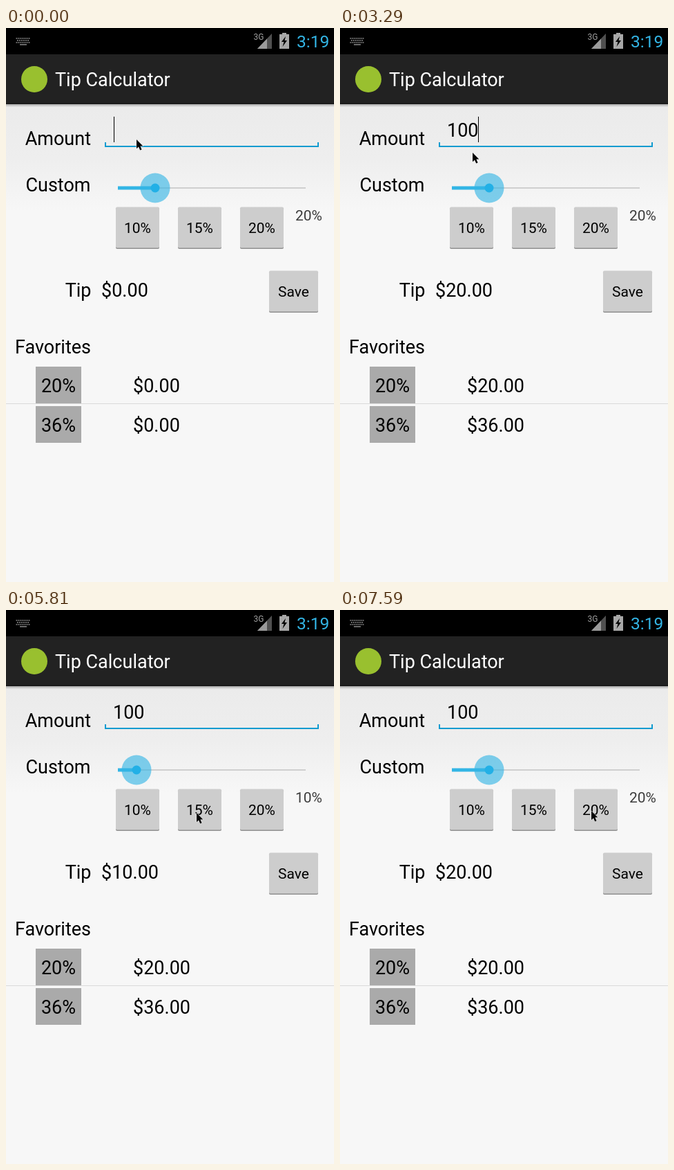
Recreate the animation shown at these times as an HTML page. Size 475 by 800 pixels, loop 8 s.

```html
<!DOCTYPE html>
<html lang="en">
<head>
<meta charset="utf-8">
<title>Tip Calculator</title>
<style>
  html, body { margin: 0; width: 100%; height: 100%; overflow: hidden; background: #f7f7f7; }
  svg { display: block; width: 475px; height: 800px; }
  text { font: 27px Roboto, "Noto Sans", sans-serif; white-space: pre; }
  .small { font-size: 21px; }
  .end { text-anchor: end; }
  .mid { text-anchor: middle; }
</style>
</head>
<body>
<svg id="stage" viewBox="0 0 475 800">
  <defs>
    <linearGradient id="page" gradientUnits="userSpaceOnUse" x1="0" y1="112" x2="0" y2="265">
      <stop offset="0" stop-color="#ebebeb"/>
      <stop offset=".5" stop-color="#eeeeee"/>
      <stop offset="1" stop-color="#f7f7f7"/>
    </linearGradient>
    <linearGradient id="shade" x1="0" y1="0" x2="0" y2="1">
      <stop offset="0" stop-color="#a8a8a8"/>
      <stop offset="1" stop-color="#e8e8e8"/>
    </linearGradient>
  </defs>
  <rect width="475" height="800" fill="url(#page)"/>
  <rect y="110" width="475" height="4" fill="url(#shade)"/>
  <rect width="475" height="110" fill="#222"/>
  <rect y="108" width="475" height="2" fill="#1a1a1a"/>
  <rect width="475" height="38" fill="#000"/>

  <!-- status bar -->
  <g id="keys" fill="#686868"><path d="M20 23h10v2H20z"/></g>
  <path d="M364 30L385 8V30Z" fill="#505050"/>
  <path d="M364 30L378 15.5V30Z" fill="#9a9a9a"/>
  <text x="358.5" y="17" fill="#a0a0a0" style="font-size:12px">3G</text>
  <path d="M400 7h6v2h4v21h-14v-21h4z" fill="#a8a8a8"/>
  <path d="M405 12l-6 8h3.5l-2 7 6.5-9h-3.5z" fill="#000"/>
  <text x="421" y="28" fill="#33b5e5" style="font-size:24.5px">3:19</text>

  <circle cx="41" cy="74" r="19" fill="#99c02f"/>
  <text x="71" y="84" fill="#fff">Tip Calculator</text>

  <!-- form -->
  <text class="end" x="123" y="169">Amount</text>
  <text class="end" x="122.5" y="236">Custom</text>
  <text class="end" x="123.5" y="388">Tip</text>
  <text class="end" x="123" y="470">Favorites</text>
  <path d="M144 165V171H452V165" fill="none" stroke="#0f9bd0" stroke-width="2"/>
  <text id="amount" y="157"></text>
  <rect id="caret" y="128" width="1" height="37"/>

  <rect x="162" y="230" width="272" height="2" fill="#cfcfcf"/>
  <rect id="fill" x="162" y="228.5" height="5" fill="#33b5e5"/>
  <g id="thumb">
    <circle r="21.5" fill="#33b5e5" fill-opacity=".62"/>
    <circle r="6.5" fill="#22b0e6"/>
  </g>
  <text id="percent" class="small" x="419" y="278" fill="#3c3c3c"></text>
  <g id="buttons"></g>
  <text id="tip" x="138" y="388"></text>
  <g id="favorites"></g>
  <rect y="542" width="475" height="1" fill="#dadada"/>

  <path id="pointer" d="M0 0V13.2L3 10.4L5.2 15.5L7.6 14.5L5.4 9.6H9.4Z"
        stroke="#fff" stroke-width="1" paint-order="stroke"/>
</svg>
<script>
const LOOP = 8000;
const $ = id => document.getElementById(id);

function add(parent, tag, attrs, text = "") {
  const el = document.createElementNS("http://www.w3.org/2000/svg", tag);
  for (const key in attrs) el.setAttribute(key, attrs[key]);
  el.textContent = text;
  parent.append(el);
  return el;
}

function button(x, y, w, label) {
  const g = $("buttons");
  add(g, "rect", { x, y: y + 1, width: w, height: 59.5, rx: 2, fill: "#909090" });
  add(g, "rect", { x, y, width: w, height: 59, rx: 2, fill: "#cdcdcd" });
  add(g, "text", { x: x + w / 2, y: y + 37.5, class: "small mid" }, label);
}

function favorite(y, rate) {
  const g = $("favorites");
  add(g, "rect", { x: 43, y, width: 66, height: 53, fill: "#aaa" });
  add(g, "text", { x: 76, y: y + 37, class: "mid" }, rate + "%");
  return { rate, value: add(g, "text", { x: 184, y: y + 37 }) };
}

for (let row = 0; row < 3; row++)
  for (let col = 0; col < 7 - row % 2; col++)
    add($("keys"), "rect", { x: 14.5 + col * 3 + row % 2 * 1.5, y: 14 + row * 3, width: 2, height: 2 });

["10%", "15%", "20%"].forEach((label, i) => button(159 + i * 90, 258.5, 63, label));
button(381, 350.5, 71, "Save");
const favorites = [favorite(489, 20), favorite(546, 36)];

// Each row: start time, then the values held until the next row.
const typed = [[0, "", 156, 156], [1200, "1", 156.5, 170], [1650, "10", 155, 185], [2100, "100", 155, 200]];
const rates = [[0, 20], [4330, 10], [6110, 15], [7590, 20]];
const blinks = [0, 150, 600, 1050, 1200, 2540, 3140, 3580, 4030, 4620, 5070, 5520, 6110, 6550, 7000, 7590];
const moves = [
  [0, 189, 161],
  [3290, 192, 180], [3440, 198, 215], [3580, 204, 250], [3730, 203, 272], [3880, 199, 284], [4030, 197, 287],
  [5370, 210, 288], [5520, 250, 292], [5660, 270, 294], [5810, 276, 293],
  [6550, 283, 293], [6700, 318, 294], [6850, 351, 293], [7000, 360, 291], [7150, 364, 290]
];

const held = (rows, t) => rows.findLast(row => row[0] <= t).slice(1);
const money = (amount, rate) => "$" + (amount * rate / 100).toFixed(2);

function setText(el, text) {
  if (el.textContent !== text) el.textContent = text;
}

function draw(t) {
  const [digits, textX, caretX] = held(typed, t);
  const [rate] = held(rates, t);
  const [px, py] = held(moves, t);
  const sliderX = 162 + 2.7 * rate;

  setText($("amount"), digits);
  $("amount").setAttribute("x", textX);
  $("caret").setAttribute("x", caretX);
  $("caret").setAttribute("opacity", blinks.filter(b => b <= t).length % 2);

  $("fill").setAttribute("width", sliderX - 162);
  $("thumb").setAttribute("transform", `translate(${sliderX} 231)`);
  setText($("percent"), rate + "%");
  setText($("tip"), money(digits, rate));
  for (const f of favorites) setText(f.value, money(digits, f.rate));

  $("pointer").setAttribute("transform", `translate(${px} ${py})`);
}

const start = performance.now();
function tick() {
  draw((performance.now() - start) % LOOP);
  requestAnimationFrame(tick);
}
tick();
</script>
</body>
</html>
```
